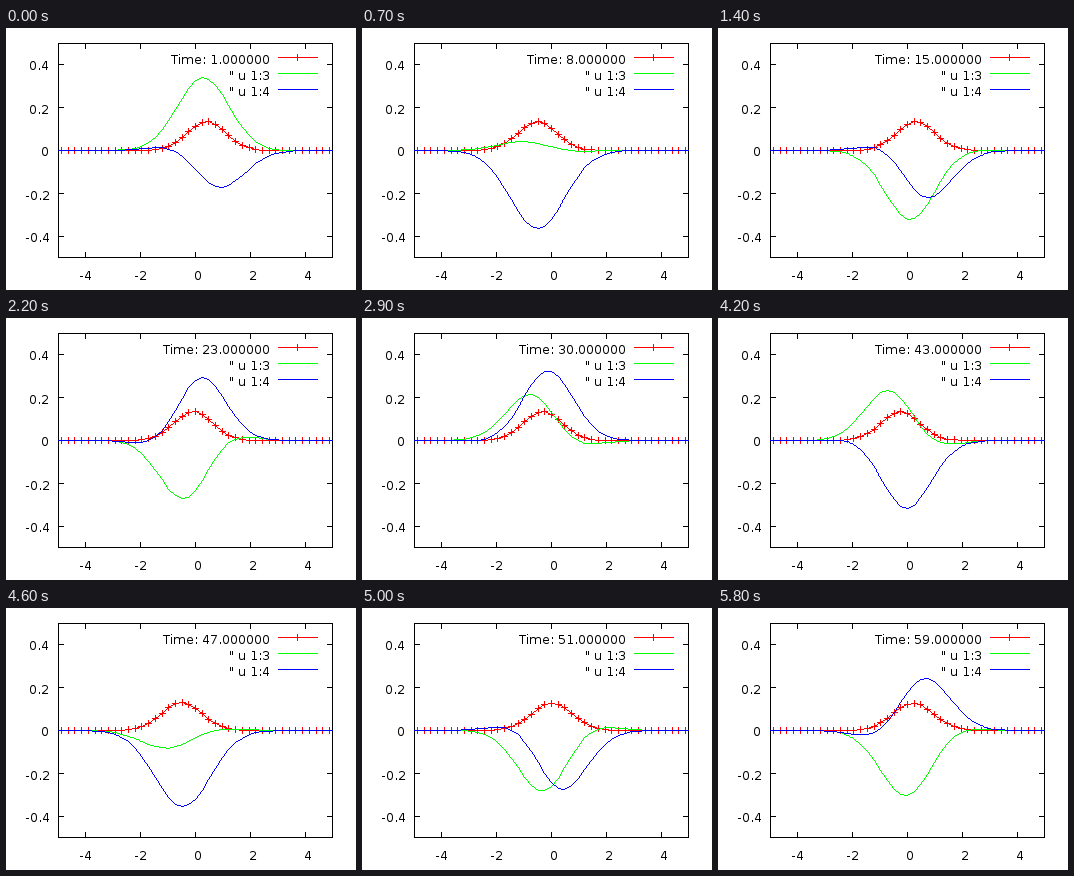
Recreate the animation shown at these times as a matplotlib script. Size 350 by 262 pixels, loop 5900 ms.

```python
import numpy as np
import matplotlib.pyplot as plt
from matplotlib.animation import FuncAnimation

W, H, DPI = 350, 262, 100
PX = 72 / DPI                                # one pixel in points
LEFT, RIGHT, TOP, BOTTOM = 52, 326, 16, 230  # plot frame
RED, GREEN, BLUE = "#ff0000", "#00ff00", "#0000ff"
COUNT, STEP = 59, 100

SWING = 0.52                                 # swing of the packet
X = np.arange(-20, 21) * 0.2445              # sample points

plt.rcParams.update({"font.family": "DejaVu Sans",
                     "text.hinting": "default",
                     "text.hinting_factor": 1})
fig = plt.figure(figsize=(W / DPI, H / DPI), dpi=DPI, facecolor="white")
ax = fig.add_axes([0, 0, 1, 1])
ax.set_xlim(0, W)
ax.set_ylim(H, 0)
ax.axis("off")


def to_px(x):
    return np.rint(LEFT + (np.asarray(x) + 5) / 10 * (RIGHT - LEFT))


def to_py(y):
    return np.rint(TOP + (0.5 - np.asarray(y)) * (BOTTOM - TOP))


def trace(xs, ys):
    """Whole-pixel points along a polyline, without smoothing."""
    parts = []
    for x0, x1, y0, y1 in zip(xs[:-1], xs[1:], ys[:-1], ys[1:]):
        n = int(max(abs(x1 - x0), abs(y1 - y0))) + 1
        parts.append([np.linspace(x0, x1, n), np.linspace(y0, y1, n)])
    return np.rint(np.hstack(parts))


def crosses(xs, ys):
    k = np.arange(-3, 4)
    xs, ys = np.asarray(xs)[:, None], np.asarray(ys)[:, None]
    across = [(xs + k).ravel(), (ys + 0 * k).ravel()]
    down = [(xs + 0 * k).ravel(), (ys + k).ravel()]
    return np.hstack([across, down])


def dots(color, pts=((), ()), z=2):
    return ax.plot(*pts, ls="none", marker=",", color=color, zorder=z)[0]


def label(x, y, s, ha):
    return ax.text(x, y, s, ha=ha, va="baseline", fontsize=13 * PX,
                   color="black")


def packet(t):
    """Coherent state of a harmonic oscillator, spreading a little late on."""
    th = (t + 1) / 3
    c, p = SWING * np.cos(th), -SWING * np.sin(th)
    s = 1 + 0.1 * np.clip((t - 43) / 8, 0, 1)
    u = X - c
    phase = p * u + p * c / 2 - th / 2
    return 0.367 * s ** -0.25 * np.exp(-u ** 2 / (2 * s) + 1j * phase)


# Frame, ticks and tick labels
dots("black", trace([LEFT, RIGHT, RIGHT, LEFT, LEFT],
                    [TOP, TOP, BOTTOM, BOTTOM, TOP]))
for v in (-4, -2, 0, 2, 4):
    x = to_px(v)
    dots("black", trace([x, x], [BOTTOM, BOTTOM - 5]))
    dots("black", trace([x, x], [TOP, TOP + 5]))
    label(x + (3 if v >= 0 else 0.5), 252, str(v), "center")
for v in (-0.4, -0.2, 0, 0.2, 0.4):
    y = to_py(v)
    dots("black", trace([LEFT, LEFT + 5], [y, y]))
    dots("black", trace([RIGHT, RIGHT - 5], [y, y]))
    label(43.5, y + 5.5, f"{v:g}", "right")

# Legend
clock = label(264, 36, "", "right")
label(264, 52, '" u 1:3', "right")
label(264, 68, '" u 1:4', "right")
for y, color in ((30, RED), (46, GREEN), (62, BLUE)):
    dots(color, trace([272, 311], [y, y]))
dots(RED, crosses([291], [30]))

density = dots(RED, z=3)
real = dots(GREEN, z=4)
imag = dots(BLUE, z=5)


def curve(values):
    """Pixel polyline reaching both sides of the frame."""
    xs = np.concatenate([[LEFT], to_px(X), [RIGHT]])
    return trace(xs, to_py(np.pad(values, 1, mode="edge")))


def draw(i):
    t = i + 1
    psi = packet(t)
    rho = np.abs(psi) ** 2
    density.set_data(*np.hstack([curve(rho), crosses(to_px(X), to_py(rho))]))
    real.set_data(*curve(psi.real))
    imag.set_data(*curve(psi.imag))
    clock.set_text(f"Time: {t:.6f}")
    return density, real, imag, clock


anim = FuncAnimation(fig, draw, frames=COUNT, interval=STEP, repeat=True,
                     repeat_delay=0, blit=False)
plt.show()
```
